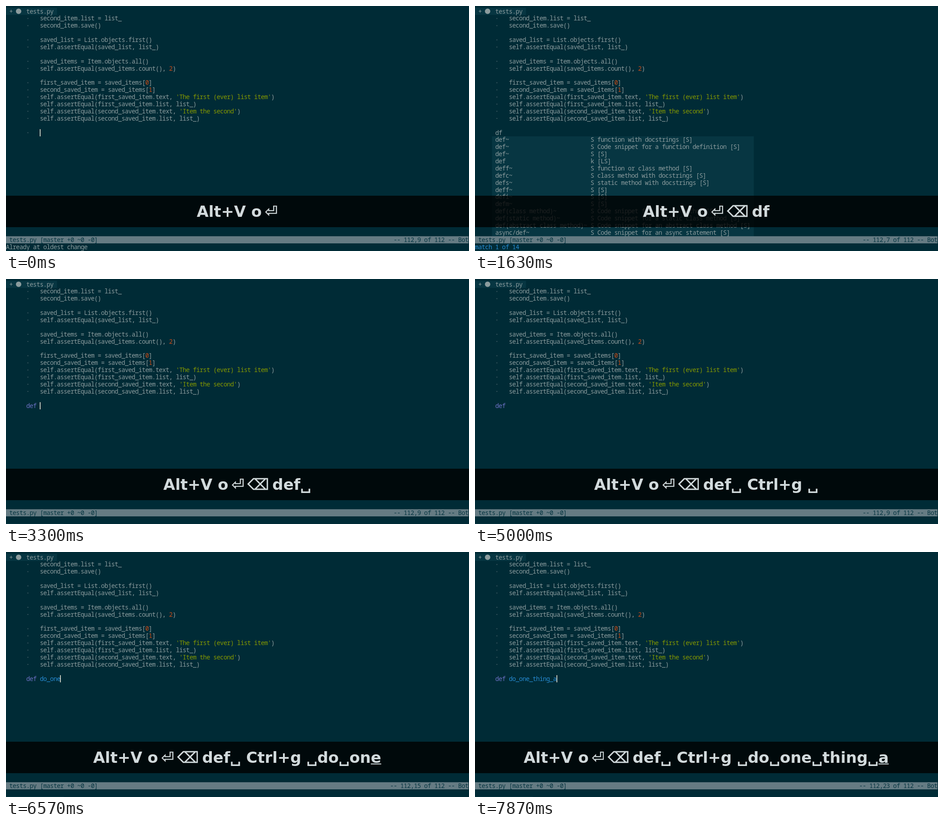
Write an HTML page with a canvas that moves like this. It is 1028 px wide and 545 px high and loops after 8 s.

```html
<!DOCTYPE html>
<html lang="en">
<head>
<meta charset="utf-8">
<title>Editor session</title>
<style>
html, body { margin: 0; width: 100%; height: 100%; overflow: hidden; background: #002b36; }
canvas { display: block; width: 100%; height: 100%; }
</style>
</head>
<body>
<canvas id="stage" width="1028" height="545"></canvas>
<script>
const W = 1028, H = 545, LOOP = 8000;
const CELL = 7.55, ROW = 15.88, TOP = 4;
const EDIT_ROW = 17, EDIT_COL = 6;
const ctx = document.getElementById('stage').getContext('2d');

const C = {
  bg: '#002b36', panel: '#073642', text: '#8c9c9e', bar: '#657b83', dot: '#3d5a63',
  string: '#859900', number: '#cb4b16', keyword: '#6c71c4', name: '#268bd2',
  cursor: '#fdf6e3', keys: '#d2dadc'
};

const code = [
  'second_item.list = list_',
  'second_item.save()',
  '',
  'saved_list = List.objects.first()',
  'self.assertEqual(saved_list, list_)',
  '',
  'saved_items = Item.objects.all()',
  'self.assertEqual(saved_items.count(), 2)',
  '',
  'first_saved_item = saved_items[0]',
  'second_saved_item = saved_items[1]',
  "self.assertEqual(first_saved_item.text, 'The first (ever) list item')",
  'self.assertEqual(first_saved_item.list, list_)',
  "self.assertEqual(second_saved_item.text, 'Item the second')",
  'self.assertEqual(second_saved_item.list, list_)'
];

const menu = [
  ['def~', 'S function with docstrings [S]'],
  ['def~', 'S Code snippet for a function definition [S]'],
  ['def~', 'S [S]'],
  ['def', 'k [LS]'],
  ['deff~', 'S function or class method [S]'],
  ['defc~', 'S class method with docstrings [S]'],
  ['defs~', 'S static method with docstrings [S]'],
  ['deff~', 'S [S]'],
  ['defi~', 'S [S]'],
  ['defm~', 'S [S]'],
  ['def(class method)~', 'S Code snippet for a class method [S]'],
  ['def(static method)~', 'S Code snippet for a static class method [S]'],
  ['def(abstract class method)~', 'S Code snippet for an abstract class method [S]'],
  ['async/def~', 'S Code snippet for an async statement [S]']
];

// Key caption pieces
const THIN = '\u2009';
const K0 = 'Alt+V o' + THIN + '⏎';
const K1 = K0 + THIN + '⌫';
const K2 = K1 + THIN + 'def␣';
const K3 = K2 + ' Ctrl+g';

// [start ms, edited line, key caption, flags]
// flags: u = newest key underlined, h = cursor hidden, g = pending ^G
const steps = [
  [0, '    ', K0, ''],
  [230, '', K1, '']
];
const add = (t, line, keys, flags = '') => steps.push([t, line, keys, flags]);
const draft = (t, word, flags) => add(t, word, K1 + THIN + word, flags);
const naming = (t, name, flags) =>
  add(t, 'def ' + name, K3 + ' ␣' + name.replace(/_/g, '␣'), flags);

draft(430, 'd', 'u');
draft(500, 'df', 'u');
draft(570, 'dfe', 'u');
draft(700, 'dfe');
draft(1630, 'df', 'h');
draft(2030, 'd');
draft(2300, 'de', 'u');
draft(2430, 'def', 'u');
draft(2570, 'def');
draft(2970, 'def', 'h');
add(3130, 'def ', K2, 'u');
add(3300, 'def ', K2);
add(4070, 'def ', K3, 'g');
naming(4470, '', 'u');
naming(4600, '');
naming(5000, '', 'h');
naming(5370, 'd', 'u');
naming(5530, 'do', 'u');
naming(5670, 'do_', 'u');
naming(5830, 'do_');
naming(6170, 'do_o', 'u');
naming(6370, 'do_on', 'u');
naming(6570, 'do_one', 'u');
naming(6700, 'do_one_', 'u');
naming(6830, 'do_one_');
naming(7200, 'do_one_th', 'u');
naming(7370, 'do_one_thi', 'u');
naming(7530, 'do_one_thin', 'u');
naming(7700, 'do_one_thing_', 'u');
naming(7870, 'do_one_thing_a', 'u');

// Use a condensed face at full size when there is one, else a smaller regular face.
const monoFont = size => `extra-condensed ${size}px "Noto Sans Mono", "DejaVu Sans Mono", monospace`;
ctx.font = monoFont(100);
const MONO = monoFont(Math.min(15.1, 8.2 / (ctx.measureText('m').width / 100)));

const rowY = row => TOP + row * ROW;

function rect(x, y, w, h, color) {
  ctx.fillStyle = color;
  ctx.fillRect(x, y, w, h);
}

function cells(text, col, row, color) {
  ctx.font = MONO;
  ctx.textAlign = 'center';
  ctx.fillStyle = color;
  [...text].forEach((ch, i) => {
    if (ch !== ' ') ctx.fillText(ch, (col + i + 0.5) * CELL, rowY(row) + 12.6);
  });
}

function indentDot(row) {
  rect(47.6, rowY(row) + 6.9, 2, 2, C.dot);
}

function codeLine(line, row) {
  if (!line) return;
  indentDot(row);
  let col = 10;
  for (const part of line.split(/('[^']*'|\b\d\b)/)) {
    const color = /^'/.test(part) ? C.string : /^\d$/.test(part) ? C.number : C.text;
    cells(part, col, row, color);
    col += part.length;
  }
}

function drawTab() {
  rect(0, TOP, 15 * CELL, ROW, C.panel);
  cells('+', 1, 0, C.text);
  ctx.fillStyle = C.text;
  ctx.beginPath();
  ctx.arc(28, 11.8, 6, 0, Math.PI * 2);
  ctx.fill();
  cells('tests.py', 6, 0, C.text);
}

function drawEdit(line, hidden) {
  if (line === '    ') indentDot(EDIT_ROW);
  const isDef = line.startsWith('def');
  cells(line.slice(0, 3), EDIT_COL, EDIT_ROW, isDef ? C.keyword : C.text);
  cells(line.slice(3), EDIT_COL + 3, EDIT_ROW, C.name);
  if (!hidden) {
    const x = Math.floor((EDIT_COL + line.length) * CELL);
    rect(x, 274, 1.5, 16, C.cursor);
  }
}

const matches = word =>
  menu.filter(([name]) => new RegExp([...word].join('.*')).test(name));

function drawMenu(items) {
  const top = EDIT_ROW + 1;
  rect(5 * CELL, rowY(top), 77 * CELL, items.length * ROW, C.panel);
  items.forEach(([name, info], i) => {
    cells(name, 6, top + i, C.text);
    cells(info, 34, top + i, C.text);
  });
}

function drawStatus(line) {
  rect(0, rowY(32), 136 * CELL, ROW, C.bar);
  cells('tests.py [master +0 ~0 -0]', 1, 32, C.panel);
  const place = `-- 112,${EDIT_COL + line.length - 1} of 112 -- Bot`;
  cells(place, 136 - place.length, 32, C.panel);
}

// Key caption
const SIZE = 34, BASE = 469, MID = 513.3;
const BOLD = `bold ${SIZE}px "DejaVu Sans", sans-serif`;
const SYMBOL = `${SIZE}px "DejaVu Sans", sans-serif`;
const advance = { [THIN]: 0.2, '⏎': 0.838, '⌫': 1.438, '␣': 0.696 };

function runWidth(run) {
  if (run in advance) return advance[run] * SIZE;
  ctx.font = BOLD;
  return ctx.measureText(run).width;
}

function drawRun(run, x, w) {
  ctx.fillStyle = ctx.strokeStyle = C.keys;
  if (run === '␣') {
    ctx.lineWidth = 3.6;
    ctx.beginPath();
    ctx.moveTo(x + 3.6, 466.5);
    ctx.lineTo(x + 3.6, 474.2);
    ctx.lineTo(x + w - 3.6, 474.2);
    ctx.lineTo(x + w - 3.6, 466.5);
    ctx.stroke();
  } else if (run in advance) {
    ctx.font = SYMBOL;
    ctx.textAlign = 'center';
    ctx.lineWidth = 0.6;
    if (run !== THIN) {
      ctx.fillText(run, x + w / 2, BASE);
      ctx.strokeText(run, x + w / 2, BASE);
    }
  } else {
    ctx.font = BOLD;
    ctx.textAlign = 'left';
    ctx.fillText(run, x, BASE);
  }
}

function drawKeys(keys, underline) {
  rect(0, 422, W, 70, 'rgba(0, 0, 0, 0.8)');
  const runs = keys.split(/([\u2009⏎⌫␣])/).filter(Boolean);
  const widths = runs.map(runWidth);
  let x = MID - widths.reduce((a, b) => a + b, 0) / 2;
  runs.forEach((run, i) => {
    drawRun(run, x, widths[i]);
    x += widths[i];
  });
  if (underline) {
    const w = runWidth(keys.slice(-1));
    rect(x - w, 470.5, w, 2, C.keys);
  }
}

function draw(time) {
  const [, line, keys, flags] = steps.filter(s => s[0] <= time).pop();
  rect(0, 0, W, H, C.bg);
  drawTab();
  code.forEach((text, i) => codeLine(text, i + 1));
  drawEdit(line, flags.includes('h'));

  if (/^[def]+$/.test(line)) {
    const items = matches(line);
    drawMenu(items);
    cells('match 1 of ' + items.length, 0, 33, C.name);
  } else if (!line.trim()) {
    cells('Already at oldest change', 0, 33, C.text);
  }
  if (flags.includes('g')) cells('^G', 125, 33, C.text);

  drawStatus(line);
  rect(0, rowY(34), 128, 2, C.panel);
  drawKeys(keys, flags.includes('u'));
}

const start = performance.now();
function tick() {
  draw((performance.now() - start) % LOOP);
  requestAnimationFrame(tick);
}
tick();
</script>
</body>
</html>
```
